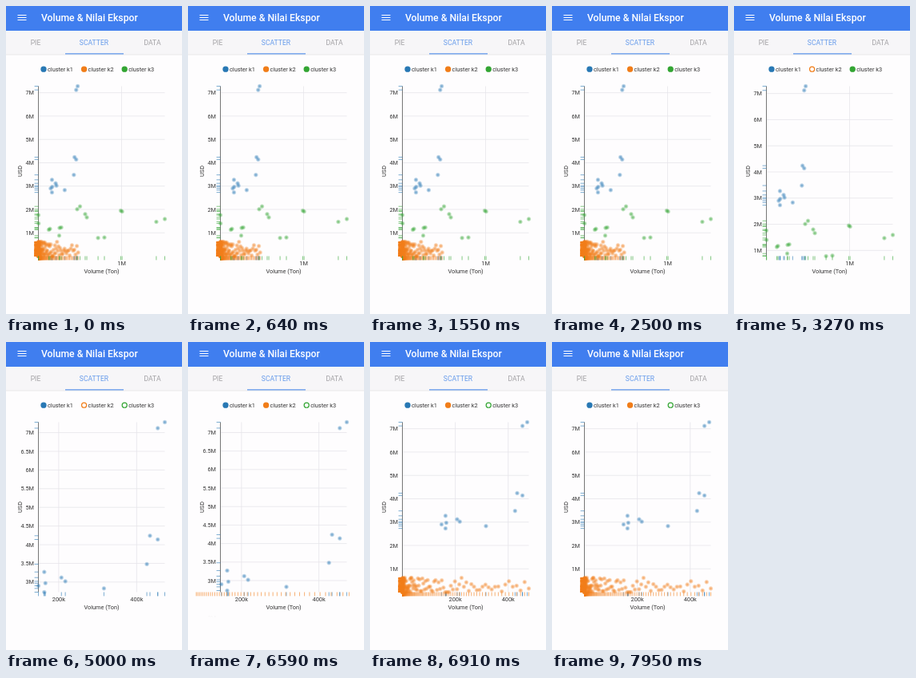
Animation of 220 by 386 pixels, one loop 8 s. Source, as an HTML page:

```html
<!DOCTYPE html>
<html lang="id">
<head>
<meta charset="utf-8">
<title>Volume &amp; Nilai Ekspor</title>
<style>
  html, body { margin: 0; width: 100%; height: 100%; overflow: hidden; background: #fefdfe; }
  svg { display: block; width: 220px; height: 386px; font: 7.35px Roboto, sans-serif; }
  .title { font-size: 12.2px; font-weight: 500; fill: #fff; }
  .tab { font-size: 8.6px; fill: #a2a1a4; text-anchor: middle; }
  .tab.active { fill: #659aeb; }
  .chart text { fill: #333; }
  .mid { text-anchor: middle; }
  .end { text-anchor: end; }
  .grid { stroke: #e6e5ea; stroke-width: .8; }
  .dist { fill: none; stroke-width: .8; stroke-opacity: .75; }
</style>
</head>
<body>
<svg viewBox="0 0 220 386">
  <defs>
    <clipPath id="frame"><rect x="9" y="66" width="197" height="279"/></clipPath>
    <linearGradient id="shade" x2="0" y2="1">
      <stop stop-color="#000" stop-opacity=".08"/>
      <stop offset="1" stop-color="#000" stop-opacity="0"/>
    </linearGradient>
  </defs>
  <rect width="220" height="31" fill="#407eef"/>
  <path d="M14.5 11.5h11M14.5 14.5h11M14.5 17.5h11" stroke="#fff" stroke-width="1.2"/>
  <text class="title" x="44" y="18.6">Volume &amp; Nilai Ekspor</text>
  <rect y="31" width="220" height="29.5" fill="#f7f6f8"/>
  <rect y="60.5" width="220" height="2" fill="url(#shade)"/>
  <text class="tab" x="37" y="49">PIE</text>
  <text class="tab active" x="110" y="49">SCATTER</text>
  <text class="tab" x="183" y="49">DATA</text>
  <rect x="74" y="59.2" width="73" height="1.3" fill="#659aeb"/>
  <g class="chart" clip-path="url(#frame)">
    <g id="axes"></g>
    <path d="M40.5 100.5V313.5" stroke="#777" stroke-width="1"/>
    <text class="mid" x="119.5" y="335.1">Volume (Ton)</text>
    <text class="mid" transform="translate(19.5 207) rotate(-90)">USD</text>
    <g id="clusters"></g>
    <g id="legend"></g>
  </g>
</svg>
<script>
const LOOP = 8000, DURATION = 250;
const LEFT = 40.5, RIGHT = 198.5, TOP = 100.5, BOTTOM = 313.5;

const byId = id => document.getElementById(id);
const mix = (a, b, p) => a + (b - a) * p;
const ease = t => t < .5 ? 4 * t ** 3 : 1 - 4 * (1 - t) ** 3;
const repeat = (count, make) => Array.from({ length: count }, (_, i) => make(i));

function set(node, attrs) {
  for (const key in attrs) node.setAttribute(key, attrs[key]);
}
function add(parent, tag, attrs, text) {
  const node = document.createElementNS('http://www.w3.org/2000/svg', tag);
  set(node, attrs);
  if (text) node.textContent = text;
  return parent.appendChild(node);
}

let seed = 11;
function random() {
  seed = (seed * 16807) % 2147483647;
  return seed / 2147483647;
}

// x is in thousands of tons, y in millions of USD
const pair = (x, y, dx, dy) => [[x - dx, y - dy], [x + dx, y + dy]];
const longTail = (count, maxX, maxY) => repeat(count, i =>
  [maxX * (i / (count - 1)) ** 5, maxY * random() ** 1.4]);

const clusters = [
  { name: 'cluster k1', color: '#2878b4', points: [
    ...pair(463, 7.2, 9, .08), ...pair(444, 4.19, 10, -.05), ...pair(212, 3.07, 5, -.05),
    ...pair(163, 3, 0, -.27), [166, 2.97], [148, 2.9], [316, 2.83], [426, 3.48]] },
  { name: 'cluster k2', color: '#f17d19', points: longTail(150, 478, .62) },
  { name: 'cluster k3', color: '#33a533', points: [
    ...pair(1468, 1.53, 51, .06), ...pair(998, 1.93, 8, -.02), ...pair(483, 2.07, 17, .06),
    ...pair(572, 1.73, 10, -.07), ...pair(755, .79, 38, .01), ...pair(265, 1.22, 10, .01),
    ...pair(132, 1.15, 7, .02), ...pair(1, 1.58, 1, -.18), [250, .88]] }
];

function span(values) {
  return [Math.min(...values), Math.max(...values)];
}
function makeState(at, on) {
  const visible = clusters.flatMap((c, i) => on[i] ? c.points : []);
  const x = span(visible.map(point => point[0]));
  const y = span(visible.map(point => point[1]));
  const ticks = ([min, max], step) =>
    repeat(Math.floor(max / step), i => (i + 1) * step).filter(v => v >= min);
  return {
    at, on, x, y,
    xTicks: ticks(x, x[1] > 1000 ? 1000 : 200),
    yTicks: ticks(y, y[0] > 2 ? .5 : 1)
  };
}
const states = [
  makeState(-DURATION, [1, 1, 1]),
  makeState(2760, [1, 0, 1]),
  makeState(4420, [1, 0, 0]),
  makeState(6545, [1, 1, 0])
];
const scaleX = (s, v) => mix(LEFT, RIGHT, (v - s.x[0]) / (s.x[1] - s.x[0]));
const scaleY = (s, v) => mix(BOTTOM, TOP, (v - s.y[0]) / (s.y[1] - s.y[0]));

function makeTicks(key) {
  const horizontal = key === 'xTicks';
  const values = [...new Set(states.flatMap(s => s[key]))];
  return values.map(value => {
    const node = add(byId('axes'), 'g', {});
    const label = !horizontal ? value + 'M' : value < 1000 ? value + 'k' : value / 1000 + 'M';
    if (horizontal) {
      add(node, 'path', { class: 'grid', d: `M0 ${TOP}V${BOTTOM}` });
      add(node, 'text', { class: 'mid', y: 324.5 }, label);
    } else {
      add(node, 'path', { class: 'grid', d: `M${LEFT} 0H${RIGHT}` });
      add(node, 'text', { class: 'end', x: 35, y: 2.6 }, label);
    }
    return { value, node };
  });
}
const xTicks = makeTicks('xTicks'), yTicks = makeTicks('yTicks');

clusters.forEach((c, i) => {
  const glow = add(document.querySelector('defs'), 'radialGradient', { id: 'glow' + i });
  repeat(5, n => add(glow, 'stop', {
    offset: n / 4, 'stop-color': c.color, 'stop-opacity': .66 * (1 - (n / 4) ** 1.5)
  }));
  c.dist = add(byId('clusters'), 'path', { class: 'dist', stroke: c.color });
  c.group = add(byId('clusters'), 'g', { fill: `url(#glow${i})` });
  c.dots = c.points.map(() => add(c.group, 'circle', { r: 3.2 }));
  const x = 47 + 50.6 * i;
  c.key = add(byId('legend'), 'circle', { cx: x, cy: 79.2, r: 3.05, stroke: c.color, 'stroke-width': 1.2 });
  add(byId('legend'), 'text', { x: x + 5, y: 81.7 }, c.name);
});

function draw(time) {
  const index = states.findLastIndex(s => time >= s.at);
  const next = states[index], prev = states[Math.max(0, index - 1)];
  const p = ease(Math.min(1, (time - next.at) / DURATION));
  const px = v => mix(scaleX(prev, v), scaleX(next, v), p);
  const py = v => mix(scaleY(prev, v), scaleY(next, v), p);

  const placeTicks = (ticks, key, move) => ticks.forEach(({ value, node }) => set(node, {
    transform: move(value),
    opacity: mix(+prev[key].includes(value), +next[key].includes(value), p)
  }));
  placeTicks(xTicks, 'xTicks', v => `translate(${px(v)} 0)`);
  placeTicks(yTicks, 'yTicks', v => `translate(0 ${py(v)})`);

  clusters.forEach((c, i) => {
    const shown = mix(prev.on[i], next.on[i], p);
    let marks = '';
    c.points.forEach(([vx, vy], n) => {
      const x = px(vx), y = py(vy);
      set(c.dots[n], { cx: x, cy: y });
      marks += `M${x} ${BOTTOM}v4.9M${LEFT} ${y}h-4.9`;
    });
    set(c.group, { opacity: shown });
    set(c.dist, { d: marks, opacity: next.on[i] ? 1 : shown });
    set(c.key, { fill: next.on[i] ? c.color : '#fff' });
  });
}

const start = performance.now();
function frame() {
  draw((performance.now() - start) % LOOP);
  requestAnimationFrame(frame);
}
frame();
</script>
</body>
</html>
```
